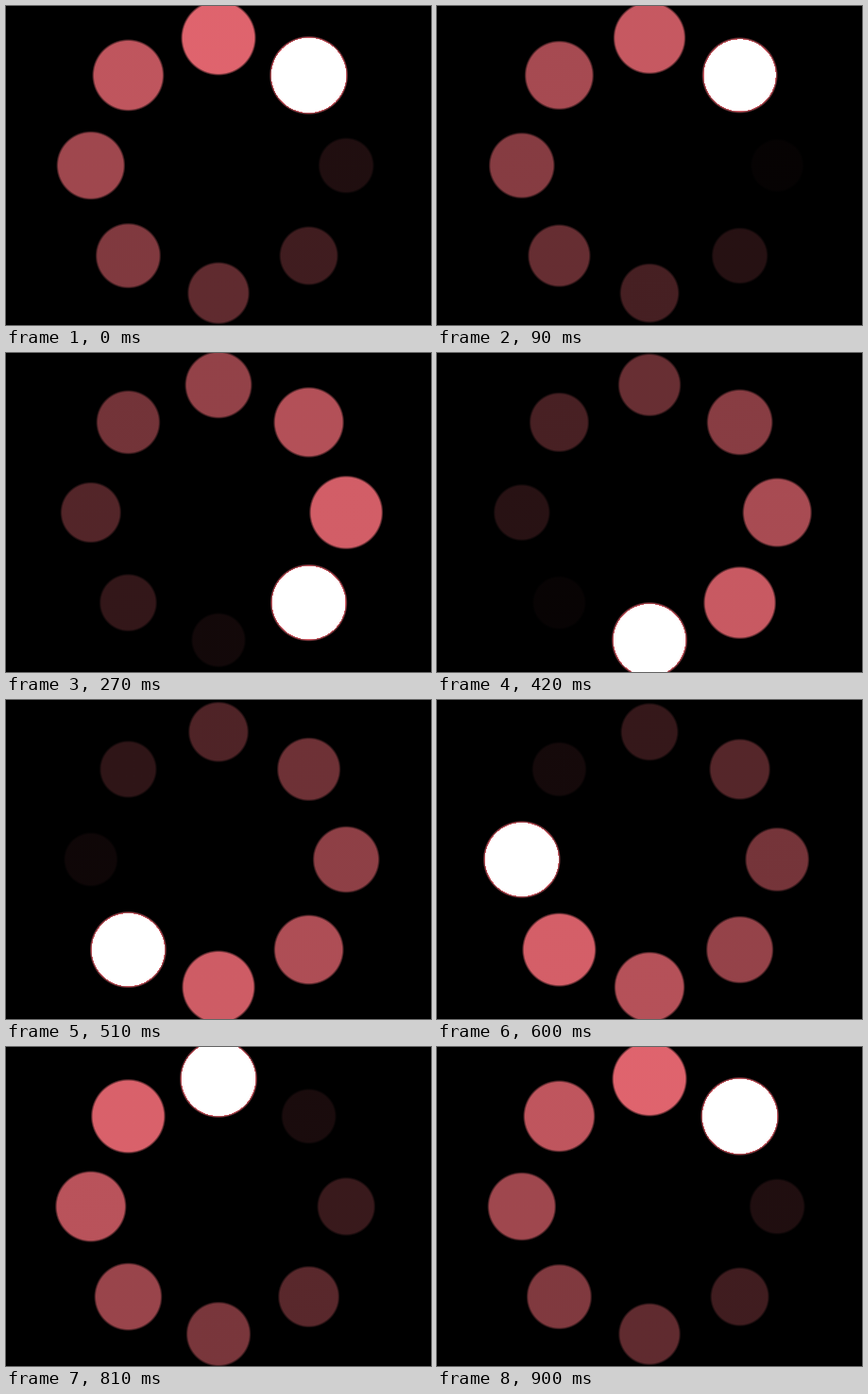
These frames come from a looping animation (450x338 px, 930 ms). An HTML page with a canvas:

```html
<!DOCTYPE html>
<html lang="en">
<head>
<meta charset="utf-8">
<title>Spinner</title>
<style>
  html, body { margin: 0; width: 100%; height: 100%; overflow: hidden; background: #000; }
  canvas { display: block; width: 450px; height: 338px; }
</style>
</head>
<body>
<canvas id="stage" width="450" height="338"></canvas>
<script>
const ctx = document.getElementById('stage').getContext('2d');
const STEP = 30, STEPS = 30, LOOP = 930;
const DOTS = 8, UNIT = 3.38;
const RING = 40 * UNIT, DOT = 8 * UNIT;
const SOFT = 1.25;  // half width of the blurred rim
const FLASH = 0.88; // anything brighter than this turns white

// Disc whose rim fades linearly from r - SOFT to r + SOFT
function softDisc(cx, cy, r, level) {
  const outer = r + SOFT;
  const fill = ctx.createRadialGradient(cx, cy, r - SOFT, cx, cy, outer);
  fill.addColorStop(0, `rgba(255, 114, 125, ${level})`);
  fill.addColorStop(1, 'rgba(255, 114, 125, 0)');
  ctx.fillStyle = fill;
  ctx.fillRect(cx - outer, cy - outer, outer * 2, outer * 2);
}

// Hard-edged disc, filled row by row on whole pixels
function hardDisc(cx, cy, r) {
  ctx.fillStyle = '#fff';
  for (let y = Math.floor(cy - r); y <= cy + r; y++) {
    const dy = y + 0.5 - cy;
    if (Math.abs(dy) >= r) continue;
    const w = Math.sqrt(r * r - dy * dy);
    const x0 = Math.ceil(cx - w - 0.5);
    const x1 = Math.floor(cx + w - 0.5);
    ctx.fillRect(x0, y, x1 - x0 + 1, 1);
  }
}

function drawDot(i, phase) {
  const level = 1 - (phase - i / DOTS + 1) % 1;
  const angle = (i - 1) * Math.PI / 4;
  const cx = 225 + RING * Math.cos(angle);
  const cy = 169 + RING * Math.sin(angle);
  const r = DOT * (1 + level / 2);
  softDisc(cx, cy, r, level);
  if (level > FLASH) hardDisc(cx, cy, r + SOFT * (1 - 2 * FLASH / level));
}

function draw() {
  const phase = Math.floor(performance.now() % LOOP / STEP) / STEPS;
  ctx.fillStyle = '#000';
  ctx.fillRect(0, 0, 450, 338);
  for (let i = 0; i < DOTS; i++) drawDot(i, phase);
  requestAnimationFrame(draw);
}
draw();
</script>
</body>
</html>
```
